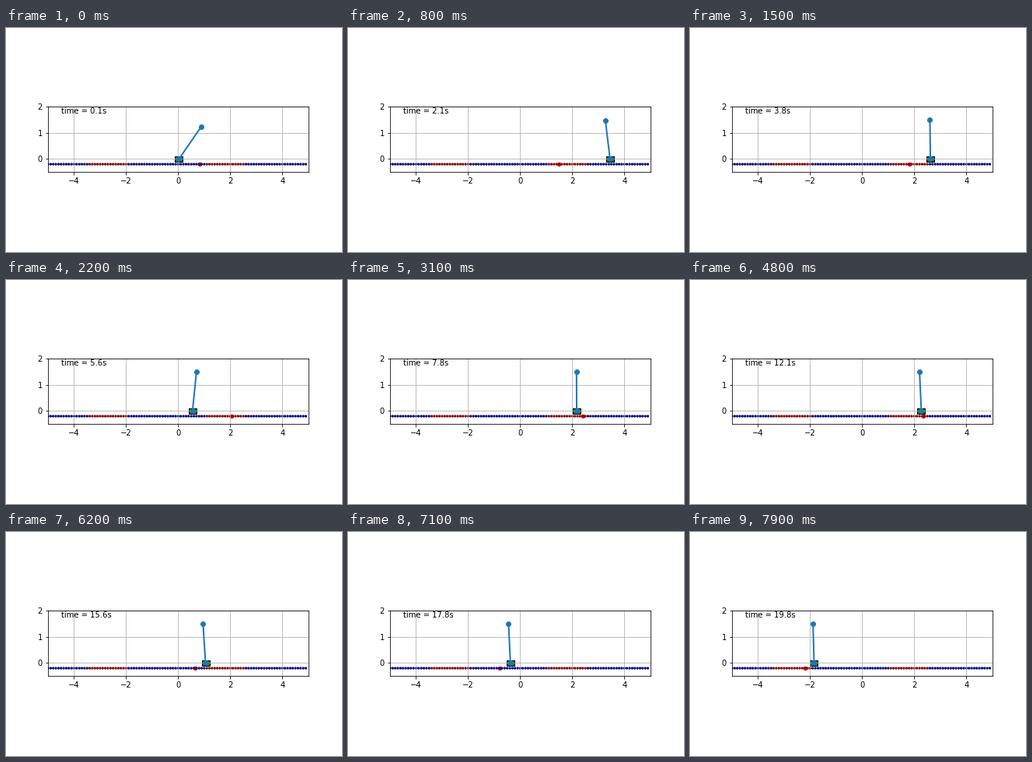
Recreate the animation shown at these times as a matplotlib script. Size 432x288 px, loop 8 s.

```python
import numpy as np
import matplotlib.pyplot as plt
from matplotlib.animation import FuncAnimation
from matplotlib.patches import Rectangle

FRAMES, INTERVAL = 80, 100
POLE = 1.5
CART_W, CART_H = 0.3, 0.2
TRACK_Y = -0.2

# Key poses: time, cart position, sine of the pole's lean, marker position
POSES = np.array([
    (0.1, 0.03, 0.567, 0.82),
    (0.8, 1.10, -0.12, 1.09),
    (2.1, 3.45, -0.12, 1.48),
    (5.6, 0.55, 0.10, 2.04),
    (10.1, 3.75, -0.12, 2.56),
    (12.1, 2.27, -0.045, 2.35),
    (15.6, 1.05, -0.064, 0.64),
    (19.8, -1.85, -0.025, -2.18),
])
TIMES, VALUES = POSES[:, 0], POSES[:, 1:]
SLOPES = np.gradient(VALUES, TIMES, axis=0)


def pose(t):
    """Cubic Hermite blend of the two poses around time t."""
    i = int(np.clip(np.searchsorted(TIMES, t) - 1, 0, len(TIMES) - 2))
    h = TIMES[i + 1] - TIMES[i]
    u = (t - TIMES[i]) / h
    v = 1 - u
    return (v * v * ((1 + 2 * u) * VALUES[i] + u * h * SLOPES[i])
            + u * u * ((1 + 2 * v) * VALUES[i + 1] - v * h * SLOPES[i + 1]))


plt.rcParams["font.family"] = "DejaVu Sans"
fig = plt.figure(figsize=(6, 4), dpi=72)
fig.subplots_adjust(left=0.125, right=0.9, bottom=0.125, top=0.88)
ax = fig.add_subplot(autoscale_on=False, xlim=(-5, 5), ylim=(-0.5, 2))
ax.set_aspect("equal")
ax.grid()

track = np.arange(-50, 50)
doors = ((track >= -34) & (track <= -20)) | ((track >= 11) & (track <= 25))
marker = ax.scatter([0], [TRACK_Y], s=20, c="red")
ax.scatter(track / 10, np.full(track.size, TRACK_Y), s=5,
           c=doors.astype(float), cmap="jet")

cart = ax.add_patch(Rectangle((0, 0), CART_W, CART_H, linewidth=1,
                              edgecolor="k", facecolor="g"))
pole, = ax.plot([], [], "o-", lw=2)
label = ax.text(0.05, 0.9, "", transform=ax.transAxes)


def update(i):
    t = (1 + 5 * i // 2) / 10
    x, lean, mark = pose(t)
    cart.set_xy((x - CART_W / 2, -CART_H / 2))
    pole.set_data([x, x + POLE * lean], [0, POLE * np.sqrt(1 - lean ** 2)])
    marker.set_offsets([(mark, TRACK_Y)])
    label.set_text(f"time = {t:.1f}s")
    return cart, pole, marker, label


anim = FuncAnimation(fig, update, frames=FRAMES, interval=INTERVAL,
                     repeat=True, repeat_delay=0, blit=False)
plt.show()
```
